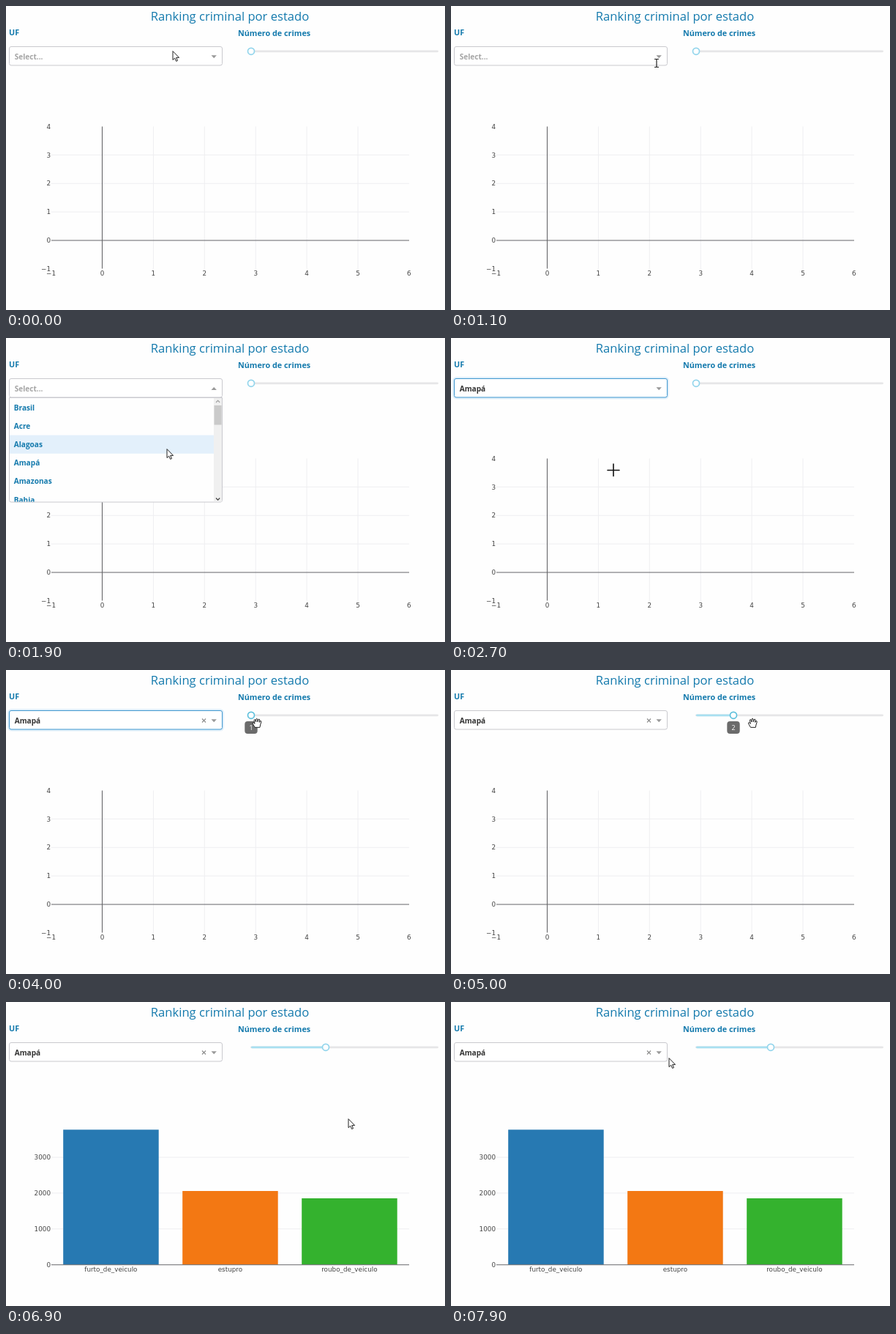
Write an HTML page that moves like this. It is 600x415 px and loops after 8000 ms.

```html
<!DOCTYPE html>
<html lang="pt-BR">
<head>
<meta charset="utf-8">
<title>Ranking criminal por estado</title>
<style>
  html, body { margin: 0; width: 100%; height: 100%; overflow: hidden; background: #fefefe; }
  svg { display: block; width: 100%; height: 100%; }
  text { font-family: "Open Sans", "Noto Sans", sans-serif; font-weight: 700; }
  .heading { font-size: 16.6px; font-weight: 500; fill: #147aad; text-anchor: middle; }
  .label { font-size: 10.8px; fill: #147aad; }
  .option { font-size: 10.15px; fill: #147aad; }
  .value { font-size: 10.1px; fill: #333; }
  .value.empty { fill: #a5a5a5; }
  .tick { font: 400 8.8px "DejaVu Sans", sans-serif; fill: #444; }
  .mid { text-anchor: middle; }
  .end { text-anchor: end; }
  .grid { stroke: #eeeef1; }
  .zero { stroke: #66666a; stroke-width: 1.1; }
  .control { fill: #fff; stroke: #c9c9ce; }
  .control.focus { stroke: #3f97cf; }
  .glow { fill: none; stroke: #e0effa; stroke-width: 3; }
  .tip text { font-size: 8.8px; font-weight: 400; fill: #fff; text-anchor: middle; }
  .handle { fill: #fff; stroke: #93d5ec; stroke-width: 1.7; }
  .handle.active { stroke: #5fc0dc; }
</style>
</head>
<body>
<svg viewBox="0 0 600 415">
  <defs>
    <clipPath id="menuClip"><rect x="5" y="82" width="290" height="141.5"/></clipPath>
  </defs>
  <text class="heading" x="306" y="19.5">Ranking criminal por estado</text>
  <text class="label" x="4" y="40.3">UF</text>
  <text class="label" x="317" y="40.8">Número de crimes</text>

  <g id="emptyChart"></g>
  <g id="barChart"></g>

  <rect id="glow" class="glow" x="3.5" y="54.5" width="293" height="27.5" rx="4"/>
  <rect id="control" class="control" x="4.5" y="55.5" width="291" height="25.5" rx="2.5"/>
  <text id="value" class="value" x="11.7" y="72.8"></text>
  <path id="clear" d="M268 66.5l5 5m0-5l-5 5" stroke="#8f8f8f" stroke-width="1.2"/>
  <path id="caret" fill="#999"/>

  <g id="menu">
    <path d="M4.5 81.5H295.5V221.5Q295.5 224 293 224H7Q4.5 224 4.5 221.5Z" fill="#fefefe" stroke="#c9c9ce"/>
    <g clip-path="url(#menuClip)">
      <rect id="hover" x="5" width="279" height="25.2" fill="#e3f0fb"/>
      <g id="options"></g>
      <rect x="284" y="82" width="11" height="142" fill="#f0f0f0"/>
      <rect x="284.5" y="92" width="10" height="26.5" fill="#cacaca"/>
      <path d="M287 88l2.6-2.6 2.6 2.6" fill="none" stroke="#a0a0a0" stroke-width="1.2"/>
      <path d="M287 218.5l2.6 2.6 2.6-2.6" fill="none" stroke="#444" stroke-width="1.3"/>
    </g>
  </g>

  <rect x="334" y="60.4" width="257" height="2.8" rx="1.4" fill="#e6e6e8"/>
  <rect id="track" x="335" y="60.4" height="2.8" rx="1.4" fill="#a9e0f1"/>
  <circle id="handle" class="handle" cy="61.8" r="4.5"/>
  <g id="tip" class="tip">
    <rect x="-8.7" y="70" width="17.4" height="17" rx="4" fill="#6b6b6b"/>
    <text id="tipText" y="81.8"></text>
  </g>

  <g id="cursor" stroke-linejoin="round" stroke-linecap="round">
    <path data-shape="arrow" d="M0 0V11.6L2.7 9.1 4.6 13.4 6.5 12.6 4.7 8.4H8.2Z" fill="#fff" stroke="#222"/>
    <path data-shape="ibeam" d="M-2.5 -5.5H-.8L0 -5 .8 -5.5H2.5M0 -5V5M-2.5 5.5H-.8L0 5 .8 5.5H2.5" fill="none" stroke="#222" stroke-width="1.2"/>
    <path data-shape="cross" d="M-8 .5H8M0 -8V8.5" fill="none" stroke="#111" stroke-width="1.6"/>
    <path data-shape="hand" d="M-3 6L-5.8 1.2Q-6.2 -.6 -4.6 -.2L-3 1.4 -4 -3.6Q-3.6 -5.2 -2.4 -4L-1.4 -1 -1.3 -5Q-.2 -6.6 .7 -5L1 -1.2 1.9 -4.5Q3.2 -5.6 3.7 -4L3.4 -.6 4.5 -2.4Q6 -2.8 5.9 -1.2L4.6 3 4 6Z" fill="#fff" stroke="#222"/>
  </g>
</svg>
<script>
const LOOP = 8000, STEP = 100;
const MENU_TOP = 82, ROW = 25.2;
const SLIDER_START = 335, SLIDER_STEP = 51;
const at = { open: 1400, pick: 2700, clear: 2800, hoverHandle: 3500, blur: 4400, release: 5700, leave: 6300, chart: 6800 };

// time, x, y, pointer shape from that time on
const path = [
  [0, 228, 62, 'arrow'], [200, 320, 66, 'arrow'], [400, 470, 72, 'arrow'], [600, 570, 78, 'arrow'],
  [800, 440, 96, 'arrow'], [1000, 310, 90, 'arrow'], [1100, 281, 78, 'ibeam'], [1500, 281, 78, 'ibeam'],
  [1600, 270, 98, 'arrow'], [1900, 220, 152, 'arrow'], [2300, 222, 180, 'arrow'], [2700, 222, 180, 'cross'],
  [2900, 236, 164, 'arrow'], [3500, 343, 72, 'hand'], [4400, 343, 72, 'hand'], [5300, 447, 72, 'hand'],
  [6300, 447, 66, 'arrow'], [6500, 451, 58, 'arrow'], [6700, 458, 90, 'arrow'], [6900, 468, 160, 'arrow'],
  [7200, 440, 190, 'arrow'], [7600, 340, 120, 'arrow'], [7900, 298, 77, 'arrow'], [LOOP, 298, 77, 'arrow']
];

const $ = id => document.getElementById(id);
const show = (el, on) => el.setAttribute('visibility', on ? 'visible' : 'hidden');

function add(parent, tag, attrs, text = '') {
  const el = document.createElementNS(parent.namespaceURI, tag);
  for (const key in attrs) el.setAttribute(key, attrs[key]);
  el.textContent = text;
  parent.append(el);
}
const line = (parent, kind, x1, y1, x2, y2) => add(parent, 'line', { class: kind, x1, y1, x2, y2 });
const tick = (parent, align, x, y, text) => add(parent, 'text', { class: 'tick ' + align, x, y }, text);
const minus = n => String(n).replace('-', '−');

function buildEmptyChart() {
  const g = $('emptyChart');
  const px = n => 131.5 + n * 69.9, py = n => 320 - n * 38.9;
  for (let n = 1; n < 6; n++) line(g, 'grid', px(n), 164.5, px(n), 358.5);
  for (let n = 1; n < 4; n++) line(g, 'grid', 62, py(n), 551, py(n));
  line(g, 'zero', 62, py(0), 551, py(0));
  line(g, 'zero', px(0), 164.5, px(0), 358.5);
  for (let n = -1; n <= 6; n++) tick(g, 'mid', px(n), 368.3, minus(n));
  for (let n = -1; n <= 4; n++) tick(g, 'end', 61, py(n) + 3.2, minus(n));
}

function buildBarChart() {
  const g = $('barChart'), base = 358.7;
  for (let n = 0; n < 4; n++) {
    const y = base - n * 48.9;
    if (n) line(g, 'grid', 62, y, 551, y);
    tick(g, 'end', 61, y + 3.2, n * 1000);
  }
  [['furto_de_veiculo', 174.3, '#2779b2'], ['estupro', 258, '#f37813'], ['roubo_de_veiculo', 268, '#34b22e']]
    .forEach(([name, top, fill], i) => {
      const x = 78.2 + i * 163;
      add(g, 'rect', { x, y: top, width: 130.5, height: base - top, fill });
      tick(g, 'mid', x + 65.2, 368.3, name);
    });
  line(g, 'zero', 62, base, 551, base);
}

function buildOptions() {
  ['Brasil', 'Acre', 'Alagoas', 'Amapá', 'Amazonas', 'Bahia'].forEach((name, i) =>
    add($('options'), 'text', { class: 'option', x: 10.7, y: 98.5 + i * ROW }, name));
}

function pointerAt(t) {
  const i = path.findIndex((p, k) => t >= p[0] && t < path[k + 1][0]);
  const [t0, x0, y0, shape] = path[i], [t1, x1, y1] = path[i + 1];
  const k = (t - t0) / (t1 - t0);
  return { x: x0 + (x1 - x0) * k, y: y0 + (y1 - y0) * k, shape };
}

function drawSelect(t, pointer) {
  const open = t >= at.open && t < at.pick, picked = t >= at.pick;
  const focused = picked && t < at.blur;
  show($('glow'), focused);
  $('control').classList.toggle('focus', focused);
  $('value').textContent = picked ? 'Amapá' : 'Select...';
  $('value').classList.toggle('empty', !picked);
  $('caret').setAttribute('d', open ? 'M280.5 71h7.4l-3.7-4z' : 'M280.5 67.3h7.4l-3.7 4z');
  show($('clear'), t >= at.clear);
  show($('menu'), open);
  const row = Math.max(0, Math.floor((pointer.y - MENU_TOP) / ROW));
  $('hover').setAttribute('y', MENU_TOP + 0.2 + row * ROW);
}

function drawSlider(t) {
  const dragX = pointerAt(Math.min(t, 5300)).x - 8;
  const steps = t < at.blur ? 0 : Math.min(2, Math.round((dragX - SLIDER_START) / SLIDER_STEP));
  const x = SLIDER_START + steps * SLIDER_STEP;
  const hovered = t >= at.hoverHandle && t < at.leave;
  $('track').setAttribute('width', x - SLIDER_START);
  $('handle').setAttribute('cx', x);
  $('handle').classList.toggle('active', hovered && t < at.release);
  show($('tip'), hovered);
  $('tip').setAttribute('transform', `translate(${x} 0)`);
  $('tipText').textContent = steps + 1;
}

function draw(now) {
  const t = Math.floor(now % LOOP / STEP) * STEP;
  const pointer = pointerAt(t);
  drawSelect(t, pointer);
  drawSlider(t);
  show($('emptyChart'), t < at.chart);
  show($('barChart'), t >= at.chart);
  $('cursor').setAttribute('transform', `translate(${pointer.x} ${pointer.y})`);
  for (const el of $('cursor').children) show(el, el.dataset.shape === pointer.shape);
}

buildEmptyChart();
buildBarChart();
buildOptions();
const start = performance.now();
function frame() {
  draw(performance.now() - start);
  requestAnimationFrame(frame);
}
frame();
</script>
</body>
</html>
```
